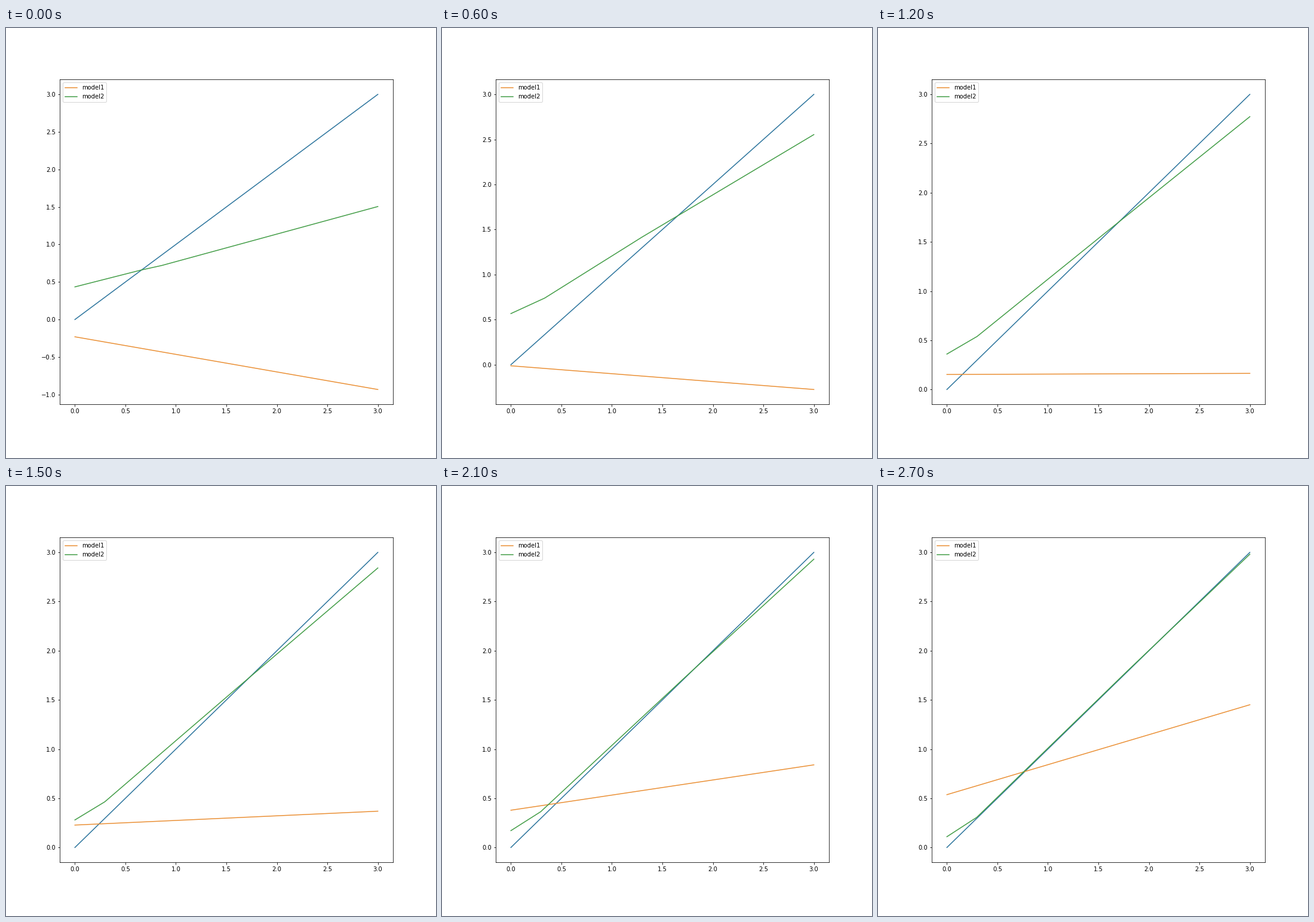
Animation of 720x720 px, one loop 3 s. Source, as a matplotlib script:

```python
import matplotlib.pyplot as plt
import numpy as np
from matplotlib.animation import FuncAnimation

STEPS, STEP_MS = 10, 300
X_MAX = 3.0
BLUE, ORANGE, GREEN = "#2a739c", "#ea8f34", "#419c45"

# The straight fit drifts smoothly through a few key training steps.
KEY_STEPS = [0, 2, 5, 7, 9]
left_drift = np.polyfit(KEY_STEPS, [-0.23, -0.012, 0.228, 0.379, 0.537], 4)
right_drift = np.polyfit(KEY_STEPS, [-0.932, -0.275, 0.369, 0.84, 1.451], 4)


def straight_fit(step):
    return [0, X_MAX], [np.polyval(left_drift, step),
                        np.polyval(right_drift, step)]


def bent_fit(step):
    """Three segments that settle exponentially onto the diagonal."""
    settle = 0.75 ** step
    jolt = 0.21 ** step ** 1.5

    start = 0.03 + 1.06 * settle - 0.655 * 0.3 ** step
    end = X_MAX + 0.0455 - 0.86 * settle - 0.68 * jolt
    first_slope = 0.68 - 0.338 * 0.7 ** step
    last_slope = 1.026 - 0.635 * settle - 0.024 * jolt

    bend1 = 0.295 + 0.365 * 0.33 ** step
    bend2 = 1.86 - settle
    xs = [0, bend1, bend2, X_MAX]
    ys = [start, start + first_slope * bend1,
          end - last_slope * (X_MAX - bend2), end]
    return xs, ys


plt.rcParams["font.family"] = "DejaVu Sans"
fig, ax = plt.subplots(figsize=(10, 10), dpi=72)
fig.subplots_adjust(left=0.125, right=0.9, bottom=0.125, top=0.88)

ax.plot([0, X_MAX], [0, X_MAX], color=BLUE)
straight_line, = ax.plot([], [], color=ORANGE, label="model1")
bent_line, = ax.plot([], [], color=GREEN, label="model2")
ax.legend(loc="upper left")


def draw(step):
    straight_line.set_data(*straight_fit(step))
    bent_line.set_data(*bent_fit(step))
    ax.relim()
    ax.autoscale_view()
    return straight_line, bent_line


anim = FuncAnimation(fig, draw, frames=STEPS, interval=STEP_MS,
                     init_func=lambda: draw(0), repeat=True, repeat_delay=0)
plt.show()
```
